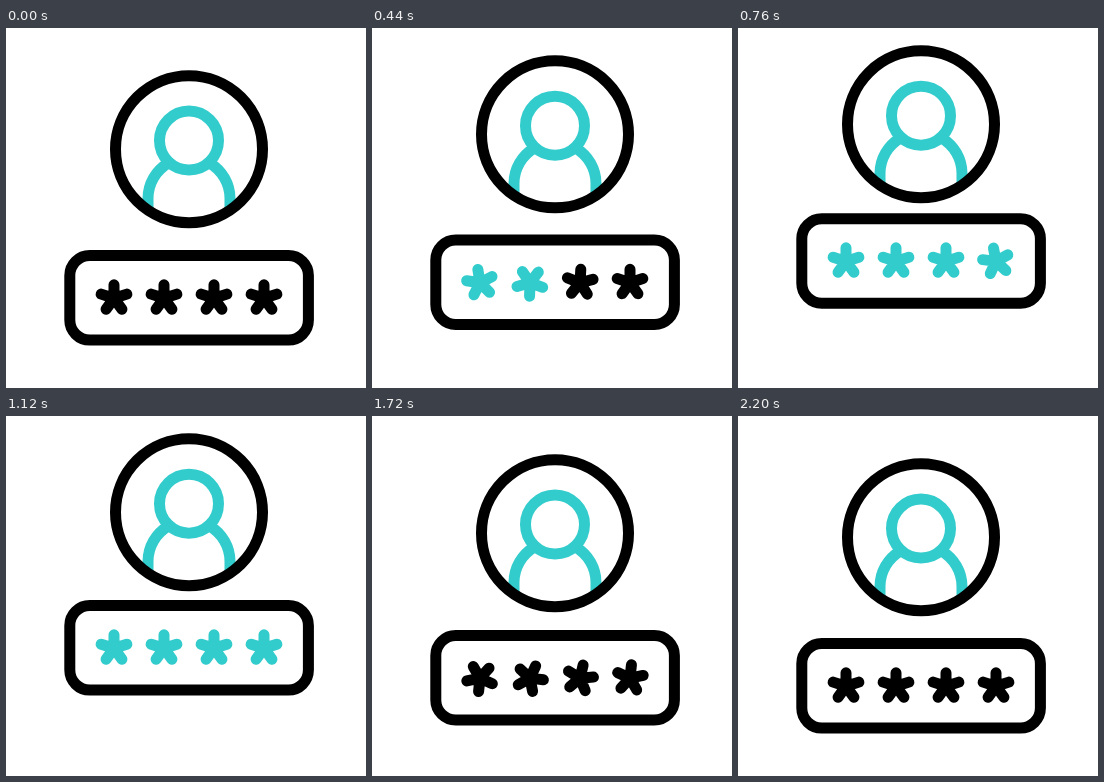
An HTML page with a canvas for the animation above (2480 ms loop, 360x360 px).

```html
<!DOCTYPE html>
<html lang="en">
<head>
<meta charset="utf-8">
<title>Password login</title>
<style>
  html, body { margin: 0; width: 100%; height: 100%; overflow: hidden; background: #fff; }
  canvas { display: block; width: 100vw; height: 100vh; }
</style>
</head>
<body>
<canvas id="stage"></canvas>
<script>
const SIZE = 360, LOOP = 2480, STEP = 40, TAU = Math.PI * 2;
const BLACK = '#000', CYAN = '#33cccc';
const canvas = document.getElementById('stage');
const ctx = canvas.getContext('2d');

// Cubic bezier easing with handles (a, 0) and (b, 1)
function ease(x, a = 0.62, b = 0.26) {
  if (x <= 0) return 0;
  if (x >= 1) return 1;
  let lo = 0, hi = 1;
  for (let i = 0; i < 24; i++) {
    const t = (lo + hi) / 2, u = 1 - t;
    if (3 * a * t * u * u + 3 * b * t * t * u + t * t * t < x) lo = t;
    else hi = t;
  }
  return lo * lo * (3 - 2 * lo);
}

const run = (t, start, length) => ease((t - start) / length);

function stroke(color) {
  ctx.strokeStyle = color;
  ctx.lineWidth = 11;
  ctx.stroke();
}

function ring(x, y, r, color) {
  ctx.beginPath();
  ctx.arc(x, y, r, 0, TAU);
  stroke(color);
}

function drawAvatar(dy) {
  ctx.save();
  ctx.translate(183, dy);
  const bend = TAU / 6;
  ctx.beginPath();
  ctx.moveTo(-41, 180);
  ctx.arc(0, 170.5, 41, Math.PI, Math.PI + bend);
  ctx.moveTo(41, 180);
  ctx.arc(0, 170.5, 41, 0, -bend, true);
  stroke(CYAN);
  ring(0, 112.6, 29.5, CYAN);
  ring(0, 121.2, 73.5, BLACK);
  ctx.restore();
}

function drawStar(x, y, turn, color) {
  ctx.save();
  ctx.translate(x, y);
  ctx.rotate(turn * TAU);
  ctx.beginPath();
  for (let i = 0; i < 5; i++) {
    const a = i * TAU / 5;
    ctx.moveTo(0, 0);
    ctx.lineTo(13.5 * Math.sin(a), -13.5 * Math.cos(a));
  }
  stroke(color);
  ctx.restore();
}

function drawField(t, dy) {
  ctx.beginPath();
  ctx.roundRect(63.8, 227.6 + dy, 238.6, 84.5, 20);
  stroke(BLACK);
  // Stars spin forward from the left, then back from the right
  for (let i = 0; i < 4; i++) {
    const turn = run(t, 195 + 108 * i, 300) - run(t, 1466 + 19 * (3 - i), 300);
    drawStar(108 + 50 * i, 270.3 + dy, turn, turn > 0.4 ? CYAN : BLACK);
  }
}

function draw(t) {
  const scale = Math.min(innerWidth, innerHeight) / SIZE;
  const ratio = devicePixelRatio || 1;
  const w = Math.round(innerWidth * ratio), h = Math.round(innerHeight * ratio);
  if (canvas.width !== w || canvas.height !== h) {
    canvas.width = w;
    canvas.height = h;
  }
  ctx.setTransform(1, 0, 0, 1, 0, 0);
  ctx.fillStyle = '#fff';
  ctx.fillRect(0, 0, w, h);
  ctx.setTransform(scale * ratio, 0, 0, scale * ratio, 0, 0);
  ctx.lineCap = 'round';
  ctx.lineJoin = 'round';
  drawAvatar(-25 * (run(t, 103, 692) - run(t, 1080, 1040)));
  drawField(t, -38 * (run(t, 84, 836) - run(t, 1095, 1085)));
}

const begin = performance.now();
function frame() {
  const t = (performance.now() - begin) % LOOP;
  draw(Math.floor(t / STEP) * STEP);
  requestAnimationFrame(frame);
}
frame();
</script>
</body>
</html>
```
